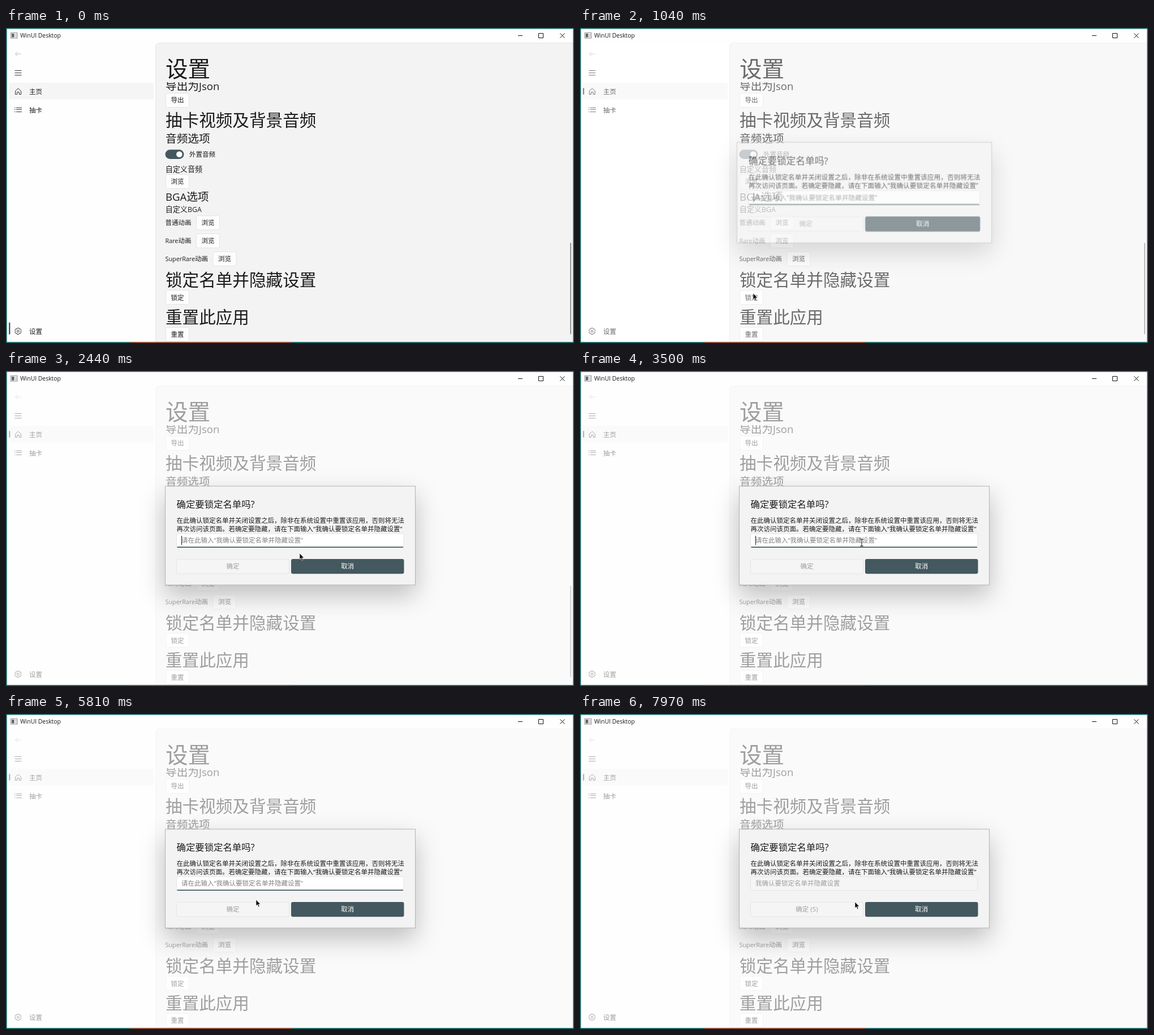
An HTML page that plays this animation: 1004x558 px, repeating every 8 s.

```html
<!DOCTYPE html>
<html lang="zh-CN">
<head>
<meta charset="utf-8">
<title>设置</title>
<style>
html, body { margin: 0; width: 100%; height: 100%; overflow: hidden; background: #fefefe; }
svg { display: block; width: 100vw; height: 100vh; }
text { font: 11.5px "Open Sans", "Noto Sans CJK SC", "Noto Sans CJK", sans-serif; fill: #1b1b1b; white-space: pre; }
.latin { font-size: .94em; }
.page { font-size: 39.6px; }
.h1 { font-size: 29.6px; }
.h2 { font-size: 19.7px; }
.h3 { font-size: 13.1px; }
.h4 { font-size: 16.4px; }
.caption { font-size: 10.4px; }
.mid { text-anchor: middle; }
.hint { fill: #828282; }
.off { fill: #a0a0a0; }
.line { fill: none; stroke: #333; stroke-width: 1; }

/* one shared 8 s timeline */
.smoke, .dialog, .mark, .scroll, .caret, .hover, .before, .after, .popup, .sheet, .pointer, .arrow, .beam {
  animation: 8s linear infinite both;
}
.mark { animation-name: mark; }
@keyframes mark {
  0% { y: 522px; height: 21px; animation-timing-function: cubic-bezier(.9,.1,1,.2); }
  1.25% { y: 106px; height: 437px; animation-timing-function: cubic-bezier(.1,.9,.2,1); }
  6.25%, 100% { y: 106px; height: 12px; }
}
.smoke { animation-name: fade; }
@keyframes fade { 0%, 12.375% { opacity: 0; } 13.44%, 100% { opacity: 1; } }
.dialog { animation-name: fade, settle; transform-origin: 502px 291px; }
@keyframes settle {
  0%, 12.375% { transform: scale(1.05); animation-timing-function: cubic-bezier(0,0,0,1); }
  15.5%, 100% { transform: scale(1); }
}
.scroll { animation-name: scroll; animation-timing-function: step-end; }
@keyframes scroll { 0% { opacity: 1; } 40.625%, 100% { opacity: 0; } }
.caret { animation-name: caret; animation-timing-function: step-end; }
@keyframes caret { 0% { opacity: 1; } 64% { opacity: 0; } 76.25% { opacity: 1; } 92.5%, 100% { opacity: 0; } }
.hover { animation-name: hover; animation-timing-function: step-end; }
@keyframes hover { 0% { opacity: 0; } 66.5% { opacity: .12; } 71%, 100% { opacity: 0; } }
.before { animation-name: before; animation-timing-function: step-end; }
@keyframes before { 0% { opacity: 1; } 92.5%, 100% { opacity: 0; } }
.after { animation-name: after; animation-timing-function: step-end; }
@keyframes after { 0% { opacity: 0; } 92.5%, 100% { opacity: 1; } }
.popup { animation-name: popup; }
@keyframes popup { 0%, 84.4% { opacity: 0; } 84.45%, 90.9% { opacity: 1; } 92.4%, 100% { opacity: 0; } }
.sheet { animation-name: sheet; }
@keyframes sheet {
  0%, 84.9% { height: 10px; animation-timing-function: cubic-bezier(.1,.7,.2,1); }
  88%, 100% { height: 248px; }
}
.pointer { animation-name: pointer; animation-timing-function: ease-in-out; }
@keyframes pointer {
  0%, 3.75% { transform: translate(300px, 562px); }
  9.375%, 13.75% { transform: translate(306px, 470px); }
  17.5%, 30.5% { transform: translate(519px, 323px); }
  33.875%, 37.375% { transform: translate(515px, 297px); }
  38.625%, 43% { transform: translate(510px, 297px); }
  43.75%, 54.125% { transform: translate(498px, 304px); }
  59%, 64% { transform: translate(452px, 345px); }
  68.125%, 70.125% { transform: translate(522px, 346px); }
  72.6%, 73% { transform: translate(442px, 329px); }
  77.75%, 86.25% { transform: translate(449px, 300px); }
  90.5%, 95.25% { transform: translate(441px, 375px); }
  96.75%, 99.25% { transform: translate(496px, 334px); }
  99.6%, 100% { transform: translate(486px, 333px); }
}
.arrow { animation-name: arrow; animation-timing-function: step-end; }
@keyframes arrow { 0% { opacity: 1; } 31.9% { opacity: 0; } 55.4% { opacity: 1; } 75.25% { opacity: 0; } 86.9%, 100% { opacity: 1; } }
.beam { animation-name: beam; animation-timing-function: step-end; }
@keyframes beam { 0% { opacity: 0; } 31.9% { opacity: 1; } 55.4% { opacity: 0; } 75.25% { opacity: 1; } 86.9%, 100% { opacity: 0; } }
</style>
</head>
<body>
<svg viewBox="0 0 1004 558" preserveAspectRatio="none">
  <defs>
    <rect id="btn" x=".5" y=".5" width="41" height="25" rx="3" fill="#fdfdfd" stroke="#e4e4e4"/>
    <clipPath id="view"><rect x="265" y="96" width="737" height="460"/></clipPath>
  </defs>
  <rect width="1004" height="558" fill="#fefefe"/>

  <!-- navigation -->
  <rect x="5" y="97" width="256" height="29.5" rx="3" fill="#f5f5f5"/>
  <rect class="mark" x="5" y="106" width="2.4" height="12" rx="1.2" fill="#44585f"/>
  <path class="line" style="stroke:#bdbdbd" d="M26.5 46H16.5M20.5 42L16.5 46L20.5 50"/>
  <path class="line" d="M15.5 75.5H27.5M15.5 79.5H27.5M15.5 83.5H27.5"/>
  <path class="line" d="M16.5 111.5L21.5 107L26.5 111.5V117.5H23.3V113.5H19.7V117.5H16.5Z"/>
  <path class="line" d="M18 141.5H28M18 144.5H28M18 148.5H28M15 141.5H16.5M15 144.5H16.5M15 148.5H16.5"/>
  <circle class="line" cx="21.3" cy="537" r="1.8"/>
  <path class="line" d="M19.8 531.5H22.8L23.4 533.3L25.4 532.9L26.9 535.4L25.6 537L26.9 538.6L25.4 541.1L23.4 540.7L22.8 542.5H19.8L19.2 540.7L17.2 541.1L15.7 538.6L17 537L15.7 535.4L17.2 532.9L19.2 533.3Z"/>
  <text x="41" y="116.5">主页</text>
  <text x="41" y="149.5">抽卡</text>
  <text x="41" y="541.5">设置</text>

  <!-- settings page -->
  <path d="M264.5 558V33Q264.5 26.5 271 26.5H1003V558Z" fill="#f3f3f3" stroke="#e7e7e7"/>
  <text class="page" x="282" y="87.3">设置</text>
  <g clip-path="url(#view)">
    <text class="h2" x="282" y="110">导出为<tspan class="latin">Json</tspan></text>
    <use href="#btn" x="282" y="115"/><text class="mid" x="303" y="132.2">导出</text>
    <text class="h1" x="282" y="174">抽卡视频及背景音频</text>
    <text class="h2" x="282" y="202.5">音频选项</text>
    <rect x="281.5" y="215.5" width="33" height="16.5" rx="8.25" fill="#44585f"/>
    <circle cx="306.3" cy="223.8" r="5.3" fill="#fff"/>
    <text x="324" y="228.2">外置音频</text>
    <text class="h3" x="281.7" y="255">自定义音频</text>
    <use href="#btn" x="282" y="259"/><text class="mid" x="303" y="275.7">浏览</text>
    <text class="h2" x="282" y="305.7"><tspan class="latin">BGA</tspan>选项</text>
    <text class="h3" x="281.7" y="325.5"><tspan>自定义</tspan><tspan class="latin">BGA</tspan></text>
    <text x="281.5" y="349.2">普通动画</text>
    <use href="#btn" x="336" y="332"/><text class="mid" x="357" y="349.2">浏览</text>
    <text x="281.5" y="381.2"><tspan class="latin">Rare</tspan>动画</text>
    <use href="#btn" x="336" y="364"/><text class="mid" x="357" y="381.2">浏览</text>
    <text x="281.5" y="413.4"><tspan class="latin">SuperRare</tspan>动画</text>
    <use href="#btn" x="365.5" y="396"/><text class="mid" x="386.5" y="413.4">浏览</text>
    <text class="h1" x="282" y="457.2">锁定名单并隐藏设置</text>
    <use href="#btn" x="282" y="464"/><text class="mid" x="303" y="481.7">锁定</text>
    <text class="h1" x="282" y="522.7">重置此应用</text>
    <use href="#btn" x="282" y="530"/><text class="mid" x="303" y="547">重置</text>
  </g>
  <rect class="scroll" x="997.3" y="380.5" width="1.7" height="162" rx=".8" fill="#858585"/>

  <rect class="smoke" y="26" width="1004" height="532" fill="#fff" fill-opacity=".58"/>

  <!-- title bar -->
  <rect x="8.5" y="8.5" width="11.5" height="9.5" fill="#f4f4f4" stroke="#8c8c8c"/>
  <rect x="10" y="10" width="4.5" height="6.5" fill="#5c6670"/>
  <path d="M16 11.5H19M16 13.5H19M16 15.5H19" stroke="#b5b5b5"/>
  <text class="caption" x="25" y="17.3">WinUI Desktop</text>
  <path class="line" style="stroke:#111" d="M905 13.5H913M941.5 9.5H949.5V17.5H941.5ZM979.5 9.5L987.5 17.5M987.5 9.5L979.5 17.5"/>

  <!-- dialog -->
  <g class="dialog">
    <rect x="281.5" y="204" width="442" height="175" fill="#f3f3f3" stroke="#b3b3b3" style="filter:drop-shadow(0 18px 22px rgba(0,0,0,.24))"/>
    <text class="h4" x="301.5" y="242">确定要锁定名单吗?</text>
    <text x="301.5" y="269.2">在此确认锁定名单并关闭设置之后，除非在系统设置中重置该应用，否则将无法</text>
    <text x="301.5" y="283.7">再次访问该页面。若确定要隐藏，请在下面输入“我确认要锁定名单并隐藏设置”</text>
    <g class="before">
      <rect x="301.5" y="288" width="401.5" height="24.5" rx="3" fill="#fff" stroke="#e5e5e5"/>
      <path d="M302.5 312.2H702" stroke="#44585f" stroke-width="1.7"/>
      <text class="hint" x="310" y="304.2">请在此输入“我确认要锁定名单并隐藏设置”</text>
      <path class="caret" d="M310.5 292V308" stroke="#111"/>
    </g>
    <g class="after">
      <rect x="301.5" y="288" width="401.5" height="24.5" rx="3" fill="#f5f5f5" stroke="#e4e4e4"/>
      <text class="off" x="310" y="304">我确认要锁定名单并隐藏设置</text>
    </g>
    <rect x="301.5" y="333.5" width="199" height="25.5" rx="3" fill="#f5f5f5" stroke="#e5e5e5"/>
    <text class="off mid before" x="401" y="350.2">确定</text>
    <text class="off mid after" x="401" y="350.2">确定 (5)</text>
    <rect x="504" y="333" width="199.5" height="26.3" rx="3.3" fill="#44585f"/>
    <rect class="hover" x="504" y="333" width="199.5" height="26.3" rx="3.3" fill="#fff"/>
    <text class="mid" x="603.8" y="350.2" style="fill:#fff">取消</text>
  </g>

  <!-- flyout -->
  <g class="popup">
    <rect x="310" y="310.5" width="240" height="270" fill="none" stroke="#858585" style="filter:drop-shadow(0 2px 4px rgba(0,0,0,.5))"/>
    <rect class="sheet" x="310.5" y="311" width="239" height="10" fill="#fdfdfd"/>
  </g>

  <!-- window frame -->
  <path d="M0 0H1004V558H0ZM1.6 1.6V556.3H1002.4V1.6Z" fill="#0d605e" fill-rule="evenodd"/>
  <path d="M220 557.2H505" stroke="#a5432a" stroke-width="1.6"/>

  <g class="pointer">
    <path class="arrow" d="M0 0V10.8L2.5 8.5L4.2 12.6L6 11.8L4.3 7.9H7.7Z" fill="#0a0a0a" stroke="#fff" stroke-width=".6"/>
    <path class="beam" d="M-3 -6H-.8L0 -5.3L.8 -6H3M0 -5.3V5.3M-3 6H-.8L0 5.3L.8 6H3" fill="none" stroke="#222" stroke-width="1.1"/>
  </g>
</svg>
</body>
</html>
```
